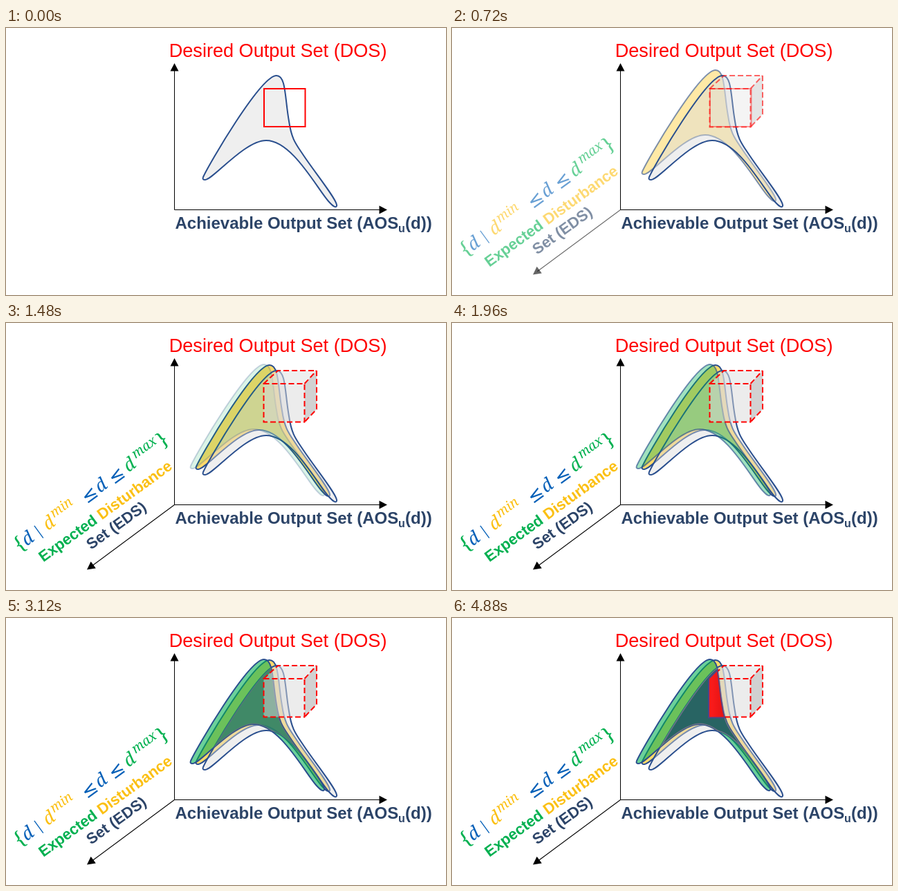
These frames come from a looping animation (636 px wide and 387 px high, 4.92 s). An HTML page with a canvas:

```html
<!DOCTYPE html>
<html>
<head>
<meta charset="utf-8">
<style>
  html, body { margin: 0; width: 100%; height: 100%; overflow: hidden; background: #fff; }
  canvas { display: block; }
</style>
</head>
<body>
<canvas id="stage" width="636" height="387"></canvas>
<script>
const ctx = document.getElementById('stage').getContext('2d');
const LOOP = 4920, STEP = 40, FADE = 1200;
const NAVY = '#2c4468', LINE = '#2a4f8e', GREEN = '#00b050', GOLD = '#fbc014', BLUE = '#0560b8';
const SANS = '"Liberation Sans", Arial, sans-serif';
const SERIF = '"Noto Serif", "Liberation Serif", serif';
const TILT = -36 * Math.PI / 180;

// The achievable set, shifted for each disturbance level
const outline = new Path2D(`M285 216 C293 198 368 69 391 69
  C405 69 403 102 409 135 C413 163 420 169 431 186 C447 210 481 252 478 258
  C477 261 473 259 466 251 C448 230 413 163 376 163
  C345 163 299 220 288 220 C284.5 220 284 218.5 285 216 Z`);
const shifted = (dx, dy) => {
  const path = new Path2D();
  path.addPath(outline, new DOMMatrix([1, 0, 0, 1, dx, dy]));
  return path;
};
const middle = shifted(-10, -8), back = shifted(-18, -9);
const polygon = (...points) => new Path2D('M' + points.join('L') + 'Z');
const desired = polygon([373, 88], [432.5, 88], [432.5, 143], [373, 143]);
const front = polygon([372.5, 88], [431.5, 88], [431.5, 143.5], [372.5, 143.5]);
const topFace = polygon([372.5, 88], [393, 69], [449, 69], [431.5, 88]);
const sideFace = polygon([431.5, 88], [449, 69], [449, 125], [431.5, 143.5]);
const cubeRegion = polygon([371, 88], [391, 68], [449, 68], [449, 144.5], [371, 144.5]);

function draw(path, fill, stroke, width = 2) {
  if (fill) { ctx.fillStyle = fill; ctx.fill(path); }
  if (stroke) { ctx.strokeStyle = stroke; ctx.lineWidth = width; ctx.stroke(path); }
}

function layer(alpha, paint) {
  if (alpha <= 0) return;
  ctx.save();
  ctx.globalAlpha = alpha;
  paint();
  ctx.restore();
}

function text(str, x, y, font, color) {
  ctx.font = font;
  ctx.fillStyle = color;
  ctx.fillText(str, x, y);
}

function axis(x, y) {
  const ox = 243.5, oy = 263.5, length = Math.hypot(x - ox, y - oy);
  ctx.save();
  ctx.translate(ox, oy);
  ctx.rotate(Math.atan2(y - oy, x - ox));
  draw(new Path2D(`M0 0H${length - 8}`), null, '#000', 1);
  draw(polygon([length, 0], [length - 11.5, -6], [length - 11.5, 6]), '#000');
  ctx.restore();
}

function tilted(x, y, paint) {
  ctx.save();
  ctx.translate(x, y);
  ctx.rotate(TILT);
  paint();
  ctx.restore();
}

function disturbanceLabels() {
  const bold = `bold 22.1px ${SANS}`;
  tilted(54, 347, () => {
    text('Expected ', 0, 0, bold, GREEN);
    text('Disturbance', ctx.measureText('Expected ').width, 0, bold, GOLD);
  });
  tilted(123, 329, () => text('Set (EDS)', 0, 0, bold, NAVY));
  tilted(20, 321, () => {
    ctx.textAlign = 'center';
    const math = `italic 26px ${SERIF}`, small = `italic 19.5px ${SERIF}`;
    const brace = `29px ${SERIF}`, relation = '27px "DejaVu Sans", sans-serif';
    text('{', 0, 9, brace, GREEN);
    text('d', 14, 8, math, BLUE);
    text('|', 33, 7, `22px ${SERIF}`, BLUE);
    text('d', 52, 8, math, GOLD);
    text('min', 80, -2, small, GOLD);
    text('≤', 124, 10, relation, BLUE);
    text('d', 145, 8, math, BLUE);
    text('≤', 172, 10, relation, BLUE);
    text('d', 196, 8, math, GREEN);
    text('max', 228, -2, small, GREEN);
    text('}', 256, 8, brace, GREEN);
  });
}

function cube() {
  draw(topFace, 'rgba(225,225,225,.55)');
  draw(sideFace, 'rgba(190,190,190,.7)');
  draw(front, 'rgba(217,217,217,.5)');
  ctx.setLineDash([8, 4]);
  draw(front, null, '#f00');
  draw(new Path2D('M372.5 88L393 69H449V125L431.5 143.5M431.5 88L449 69'), null, '#f00');
}

function overlap() {
  ctx.clip(outline);
  ctx.clip(back);
  draw(outline, '#286463', '#6d7189', 3);
  draw(back, null, '#6d7189', 3);
}

function feasiblePart() {
  ctx.clip(outline);
  ctx.clip(back);
  const red = ctx.createLinearGradient(371, 0, 396, 0);
  red.addColorStop(0, '#ff1c1c');
  red.addColorStop(1, '#e01212');
  draw(cubeRegion, red, '#4d4587');
  ctx.clip(cubeRegion);
  draw(back, null, '#4d4587', 3);
}

function render(now) {
  const time = Math.floor(now % LOOP / STEP) * STEP;
  const [eds, second, common, feasible] =
    [0, 1, 2, 3].map(i => Math.min(1, Math.max(0, time / FADE - i)));

  ctx.fillStyle = '#fff';
  ctx.fillRect(0, 0, 636, 387);

  layer(eds, () => {
    axis(117, 357.5);
    disturbanceLabels();
    draw(middle, 'rgba(255,192,0,.58)', LINE);
  });
  draw(outline, 'rgba(217,217,217,.43)', LINE);
  layer(second, () => draw(back, 'rgba(0,176,80,.58)', LINE));
  layer(common, overlap);
  layer(eds, cube);
  layer(1 - eds, () => draw(desired, null, '#f00'));
  layer(feasible, feasiblePart);

  axis(243.5, 51);
  axis(551, 263.5);
  text('Desired Output Set (DOS)', 235.7, 42, `27.1px ${SANS}`, '#f00');
  const bold = `bold 24px ${SANS}`;
  text('Achievable Output Set (AOS', 244.5, 291, bold, NAVY);
  text('u', 567, 296, `bold 16px ${SANS}`, NAVY);
  text('(d))', 577, 291, bold, NAVY);

  requestAnimationFrame(loop);
}

const start = performance.now();
function loop() { render(performance.now() - start); }
loop();
</script>
</body>
</html>
```
